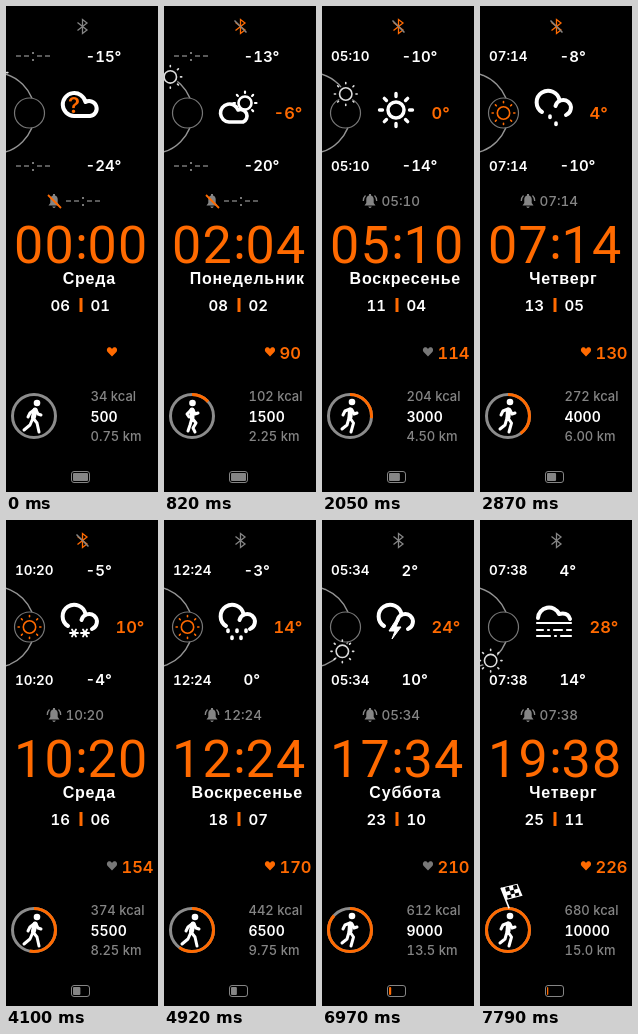
An HTML page that plays this animation: 152x486 px, repeating every 8.2 s.

```html
<!DOCTYPE html>
<html lang="ru">
<head>
<meta charset="utf-8">
<style>
html, body { margin: 0; width: 100%; height: 100%; overflow: hidden; background: #000; }
svg { display: block; }
text { font-family: Inter, Roboto, sans-serif; font-variant-numeric: tabular-nums; fill: #fff; white-space: pre; }
.b { font-weight: 600; }
.small { font-size: 13.5px; }
.mid { font-size: 15px; }
.big { font-size: 16.5px; }
.stat { font-size: 13px; font-weight: 500; }
.clock { font-family: Roboto, sans-serif; font-size: 52px; letter-spacing: 1.3px; }
.week { font: bold 16px "Liberation Sans", Arial, sans-serif; letter-spacing: .8px; }
.line { fill: none; stroke: #fff; stroke-linecap: round; stroke-linejoin: round; }
text.gray, .gray { fill: #858585; }
text.orange, .orange { fill: #ff6a00; }
</style>
</head>
<body>
<svg width="152" height="486" viewBox="0 0 152 486">
  <defs>
    <g id="blank" fill="#777">
      <path d="M0 0h5M8 0h5M21 0h5M29 0h5" stroke="#777" stroke-width="1.5"/>
      <rect x="16" y="-4" width="2" height="2"/><rect x="16" y="3" width="2" height="2"/>
    </g>
  </defs>

  <path id="bluetooth" d="M71.500 16.500l9.500 7.500-4.500 3.500v-14l4.500 3.500-9.500 7.500" fill="none" stroke-width="1.300"/>
  <path id="btOff" d="M70.500 14.500l12 12" stroke="#858585" stroke-width="1.500"/>

  <g id="noSun"><use href="#blank" x="10" y="50"/><use href="#blank" x="10" y="160"/></g>
  <text id="rise" class="b small" x="9" y="55"/>
  <text id="set" class="b small" x="9" y="165"/>
  <text id="high" class="b mid" x="79.500" y="56"/>
  <text id="low" class="b mid" x="79.500" y="165"/>
  <text id="temp" class="b big orange" x="109.500" y="113"/>

  <circle cx="-12" cy="107" r="40.500" fill="none" stroke="#949494" stroke-width="1.400"/>
  <circle cx="23.500" cy="107" r="15" fill="#000" stroke="#777" stroke-width="1.200"/>
  <g id="sun"></g>
  <g id="weather" class="line"></g>

  <g transform="translate(48 195)">
    <path class="gray" d="M-5.500 4.500l1.800-2.500v-3.500q0-3.200 2.700-4v-1.500h2v1.500q2.700 .8 2.700 4v3.500l1.800 2.500zM-1.800 5.500h3.600q-1.800 3-3.600 0z"/>
    <path id="bellWaves" d="M-4.500 -5.500q-2.200 2-2.200 5.500M4.500 -5.500q2.200 2 2.200 5.500" fill="none" stroke="#858585" stroke-width="1.300"/>
    <path id="bellOff" d="M-6 -6L7 7" stroke="#ff6a00" stroke-width="1.800"/>
  </g>
  <use id="noAlarm" href="#blank" x="60" y="195"/>
  <text id="alarm" class="small gray" style="font-weight:500" x="59.500" y="200"/>

  <text id="hour" class="clock orange" x="8" y="257"/>
  <text id="minute" class="clock orange" x="81.500" y="257"/>
  <circle class="orange" cx="75.500" cy="232" r="2.900"/>
  <circle class="orange" cx="75.500" cy="250" r="2.900"/>
  <text id="week" class="week" x="83.300" y="278" text-anchor="middle"/>
  <text id="day" class="b mid" x="44.500" y="305"/>
  <rect class="orange" x="73.500" y="292" width="3" height="14"/>
  <text id="month" class="b mid" x="84.500" y="305"/>

  <path id="heart" d="M106 350.500l-4.600-4.800c-2-3.500 2.600-6.200 4.600-2.700 2-3.500 6.600-.8 4.600 2.700z"/>
  <text id="pulse" class="b big orange" x="115.500" y="353"/>

  <g fill="none" stroke-width="3">
    <circle cx="28" cy="410" r="21.500" stroke="#8c8c8c"/>
    <circle id="ring" cx="28" cy="410" r="21.500" pathLength="100" stroke="#ff6a00" transform="rotate(-90 28 410)"/>
  </g>
  <circle id="head" r="3.300" fill="#fff"/>
  <path id="torso" class="line" stroke-width="5"/>
  <path id="limbs" class="line" stroke-width="3"/>
  <g id="flag" transform="translate(20 368) rotate(-14)">
    <path d="M1 0L4 22" stroke="#fff" stroke-width="1.600"/>
    <path d="M1 0h17l2 13h-17z" fill="#fff"/>
    <path d="M5 1h4v4h4v-4h4v4h-4v4h4v3h-4v-3h-4v3h-4v-3h4v-4h-4z" fill="#000"/>
  </g>
  <text id="kcal" class="stat gray" x="84.500" y="395"/>
  <text id="steps" class="b" style="font-size:14px" x="84.500" y="416"/>
  <text id="km" class="stat gray" x="84.500" y="435"/>

  <rect x="65.500" y="465.500" width="18" height="11" rx="2.500" fill="none" stroke="#858585"/>
  <rect id="battery" x="67" y="467" height="8" rx="1"/>
</svg>
<script>
const STEP = 410, COUNT = 20;
const $ = id => document.getElementById(id);
const text = (id, value) => { $(id).textContent = value; };
const show = (id, on) => { $(id).style.display = on ? '' : 'none'; };
const attr = (id, name, value) => $(id).setAttribute(name, value);
const pad = n => String(n).padStart(2, '0');

const WEEK = ['Воскресенье', 'Понедельник', 'Вторник', 'Среда', 'Четверг', 'Пятница', 'Суббота'];

const path = (d, w = 4, extra = '') => `<path d="${d}" stroke-width="${w}" ${extra}/>`;

function rays(x, y, inner, outer, n = 8) {
  let d = '';
  for (let i = 0; i < n; i++) {
    const a = i * 2 * Math.PI / n, c = Math.cos(a), s = Math.sin(a);
    d += `M${x + inner * c} ${y + inner * s}L${x + outer * c} ${y + outer * s}`;
  }
  return d;
}

const CLOUD = path('M68 110A11.5 11.5 0 1 1 79.5 96A7.5 7.5 0 1 1 84 110Z');
const OPEN = path('M62 106A11.5 11.5 0 1 1 79.5 94.5M75.5 100A7.8 7.8 0 1 1 86 109');
const SUN = `<circle cx="74" cy="104" r="8" stroke-width="3.5"/>` + path(rays(74, 104, 13.5, 16.5), 3.4);
const PARTLY = `<circle cx="81" cy="97" r="6.5" stroke-width="2.6"/>` + path(rays(81, 97, 10, 11.5), 2.2) +
  path('M65 116A9 9 0 1 1 74 104A6.5 6.5 0 1 1 79 116Z', 3.6, 'fill="#000"');
const flakes = (...xs) => xs.map(x => path(rays(x, 113, 0, 4, 6), 1.8)).join('');
const drops = (...xs) => xs.map((x, i) => path(`M${x} ${i % 2 ? 117 : 110}v1.5`, 3.6)).join('');
const FOG = path('M58 98A11 11 0 0 1 79 94Q88 92 90 99', 4) +
  path('M57 103H91M57 110H63M68 110H69M74 110H82M87 110H91M57 116H70M75 116H76M81 116H91', 2.2);
const BOLT = path('M74 100L67 111H73L70 119L79 107H74L77 100Z', 1, 'fill="#fff"');
const UNKNOWN = CLOUD + '<text x="62" y="107" class="b orange" stroke="none" font-size="22">?</text>';

const WEATHER = [
  PARTLY, PARTLY + drops(64, 70, 76), PARTLY + flakes(70), SUN, CLOUD,
  OPEN + drops(70, 76), OPEN + flakes(74), OPEN + drops(65, 71, 77), OPEN + flakes(68, 79),
  OPEN + flakes(64, 74, 84), OPEN + drops(64, 68, 73, 77, 82), FOG,
  OPEN + drops(64, 69, 73, 77, 82), FOG, FOG, OPEN + BOLT, OPEN + flakes(64, 74, 84), FOG
];

const pose = (x, y, torso, limbs) => ({ x, y, torso, limbs });
const STRIDE = pose(31, 397, 'M29 404L27.5 411',
  'M27 412L31 417L33 426M27 412L24 419L18 424M28 404L24 407L22 411M30 404L32 408L35 409');
const TUCK = pose(28.5, 397, 'M28 404L28 411',
  'M28 412L32 417L29 422L31 426M28 412L26 419L24 425M27 404L23 408L25 411M29 404L31 408L34 407');
const RUN = pose(30, 396, 'M28.5 404L28 411',
  'M28 412L31.5 417L29 426M27 412L25 419L20 423M28 403L23 405L21 409M30 404L32 408L35 407');
const POSES = [STRIDE, RUN, TUCK, TUCK, STRIDE, RUN];

function drawSun(k) {
  const noon = k > 5 && k < 16;
  const angle = (k < 6 ? -28 + (k - 5) * 11.7 : 37 + (k - 17) * 9.5) * Math.PI / 180;
  const x = noon ? 23.5 : -12 + 40.5 * Math.cos(angle);
  const y = noon ? 107 : 107 + 40.5 * Math.sin(angle);
  const color = noon ? '#ff6a00' : '#ddd';
  $('sun').innerHTML = (noon ? '' : `<circle cx="${x}" cy="${y}" r="8.5"/>`) +
    `<g fill="none" stroke="${color}" stroke-width="1.6" stroke-linecap="round">
      <circle cx="${x}" cy="${y}" r="6.2"/><path d="${rays(x, y, 10.2, 11.4)}"/></g>`;
}

function draw(k) {
  const n = k + 1, month = 1 + (n >> 1), day = 6 + k;
  const timed = k > 2, known = k > 1, linked = k < 2 || k > 10;
  const time = pad((k + 11) % 12 + 1) + ':' + pad(2 * k);

  attr('bluetooth', 'stroke', linked ? '#858585' : '#ff6a00');
  show('btOff', !linked);
  show('noSun', !timed);
  show('noAlarm', !timed);
  show('bellOff', !timed);
  show('bellWaves', timed);
  for (const id of ['rise', 'set', 'alarm']) text(id, timed ? time : '');

  text('high', k - 15 + '°');
  text('low', 2 * k - 24 + '°');
  text('temp', known ? 2 * k - 10 + '°' : '');
  $('weather').innerHTML = known ? WEATHER[k - 2] : UNKNOWN;
  drawSun(k);

  text('hour', pad(k));
  text('minute', pad(2 * k));
  text('week', WEEK[new Date(2021, month - 1, day).getDay()]);
  text('day', pad(day));
  text('month', pad(month));

  attr('heart', 'fill', k % 6 < 3 ? '#ff6a00' : '#777');
  text('pulse', k ? 74 + 8 * k : '');
  text('kcal', 34 * n + ' kcal');
  text('steps', 500 * n);
  text('km', (0.75 * n).toFixed(2).slice(0, 4) + ' km');

  // The ring fills in fifteen discrete segments.
  attr('ring', 'stroke-dasharray', `${Math.floor(n * 0.75) / 15 * 100} 100`);
  show('ring', k > 0);
  show('flag', n === COUNT);

  const p = POSES[k % 6];
  attr('head', 'cx', p.x);
  attr('head', 'cy', p.y);
  attr('torso', 'd', p.torso);
  attr('limbs', 'd', p.limbs);

  const used = Math.max(0, (k - 1) >> 1);
  attr('battery', 'width', 15 - 2.2 * used + 0.075 * used * used);
  attr('battery', 'fill', used > 7 ? '#ff6a00' : '#858585');
}

let last = -1;
function tick() {
  const k = Math.floor(performance.now() / STEP) % COUNT;
  if (k !== last) draw(last = k);
  requestAnimationFrame(tick);
}
tick();
</script>
</body>
</html>
```
